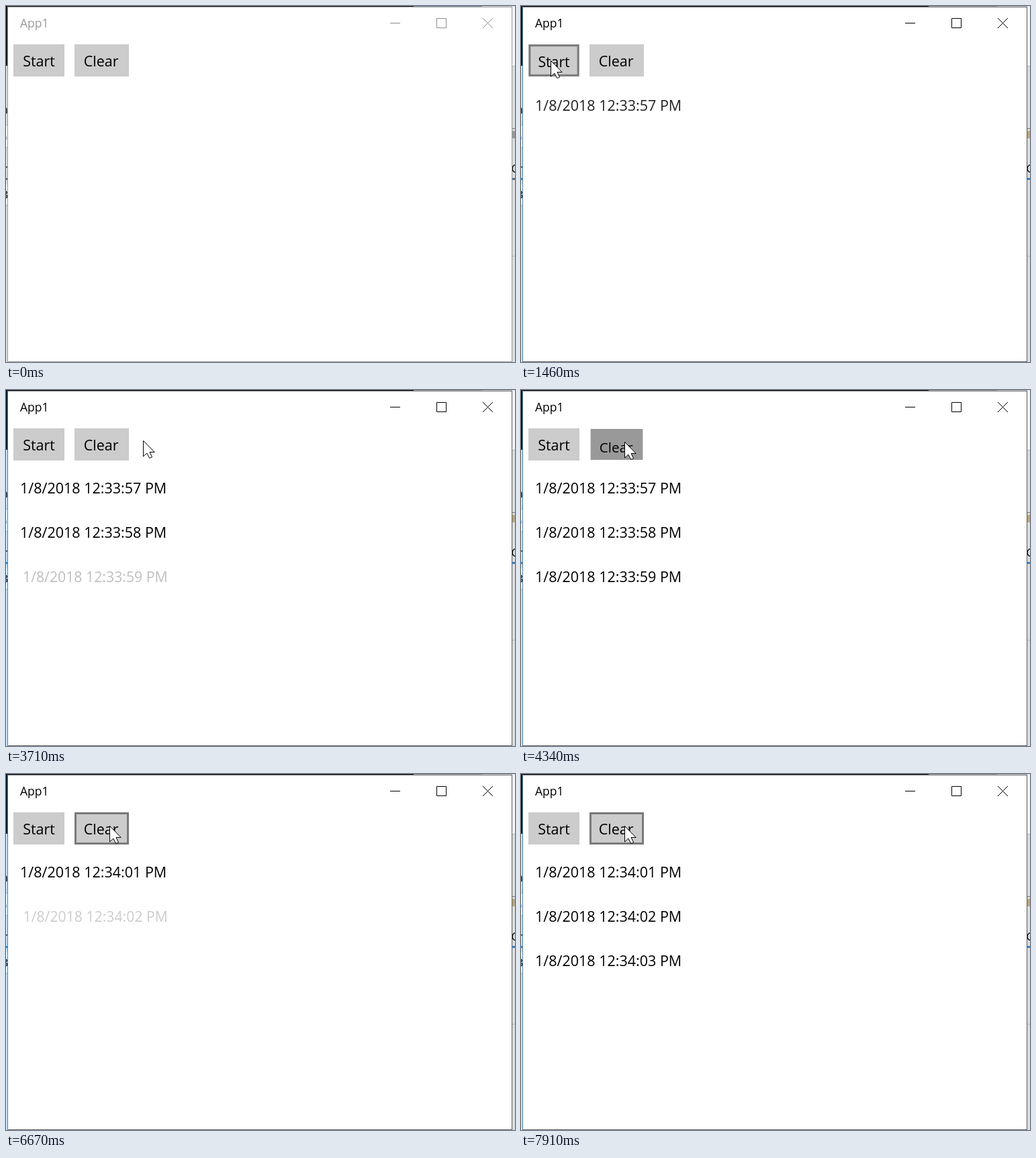
Recreate the animation shown at these times as an HTML page. Size 758x530 px, loop 8 s.

```html
<!DOCTYPE html>
<html lang="en">
<head>
<meta charset="utf-8">
<title>App1</title>
<style>
  html, body { margin: 0; width: 100%; height: 100%; overflow: hidden; background: #fff; }
  svg { display: block; font: 21.5px "Open Sans", "Noto Sans", sans-serif; }
  .icons { fill: none; stroke: #000; }
  .edge { fill: #5c5c5c; }
  .accent, .side { fill: #2a86d0; }
  .thumb { fill: #bba67c; }
  .sky { fill: #b4b8bb; }
  .idle .icons { stroke: #8c8c8c; }
  .idle .title { fill: #999; }
  .idle .edge, .idle .side { fill: #989898; }
  .idle .accent { fill: #50708f; }
  .idle .thumb { fill: #999; }
  .idle .sky { fill: #7896a5; }
</style>
</head>
<body>
<svg id="stage" width="758" height="530">
  <!-- desktop visible around the window -->
  <rect width="758" height="530" fill="#dcdcdc"/>
  <rect width="607" height="1" fill="#141414"/>
  <rect class="sky" x="607" width="102" height="1"/>
  <rect width="2" height="89" fill="#141414"/>
  <path d="M754 1h4v88h-4z" fill="#f4f4f4"/>
  <path d="M0 178h2v32H0zM0 265h2v31H0z" fill="#fafafa"/>
  <path d="M0 177.500h2M0 210.500h2M0 296.500h2M754 89.500h4M754 372.500h4" stroke="#b8b8b8"/>
  <path d="M754 182.500h4" stroke="#777"/>
  <rect class="thumb" x="754" y="186" width="4" height="11"/>
  <path class="accent" d="M0 256h2v3H0zM754 256h4v3h-4z"/>
  <g font-size="16">
    <text x="-7" y="160">n</text>
    <text x="-8" y="201" class="accent">o</text>
    <text x="-4" y="248">r</text>
    <text x="-6" y="287">3</text>
    <text x="752.500" y="248">C</text>
  </g>

  <!-- window -->
  <rect class="edge" x="2" y="1" width="752" height="529"/>
  <rect class="side" x="2" y="1" width="1" height="529"/>
  <rect x="3" y="2" width="750" height="527" fill="#fff"/>
  <text class="title" x="21" y="32" font-size="17.500">App1</text>
  <path class="icons" d="M572 25.500h15M641.500 18.500h14v14h-14zM710 18l15 15M725 18l-15 15"/>
  <g id="buttons"></g>
  <g id="items"></g>
  <path id="cursor" fill="#fff" stroke="#000" d="M.5 .5V24L5.800 19l4 7.500 3.800-1.700L10 17.500h7.200z"/>
</svg>
<script>
const LOOP = 8000, CLEARED = 4490;
const byId = id => document.getElementById(id);

function add(parent, tag, attrs, text = '') {
  const node = document.createElementNS('http://www.w3.org/2000/svg', tag);
  set(node, attrs);
  node.textContent = text;
  return parent.appendChild(node);
}
function set(node, attrs) {
  for (const key in attrs) node.setAttribute(key, attrs[key]);
}

// Progress 0..1 in n held steps; the first shows at start, the last at end.
function stepped(t, start, end, n) {
  if (t < start) return 0;
  if (t >= end) return 1;
  return (Math.floor((t - start) / (end - start) * (n - 1)) + 1) / n;
}

// start, end, steps, from, to, easing power
const moves = [
  [140, 690, 8, [598, 536], [44, 81], 1.6],
  [1620, 2090, 7, [44, 81], [317, 98], 1.6],
  [3560, 3710, 3, [317, 98], [204, 75], 1],
  [3785, 3940, 3, [204, 75], [154, 77], 1.6],
];

const buttons = [
  { label: 'Start', x: 11, width: 76, textX: 25.2, down: [990, 990, 1], release: 1240, up: [1310, 1530, 4] },
  { label: 'Clear', x: 102, width: 81, textX: 115.8, down: [4250, 4340, 2], release: CLEARED, up: [4650, 4870, 4] },
];
for (const b of buttons) {
  b.group = add(byId('buttons'), 'g', {});
  b.face = add(b.group, 'rect', { x: b.x, y: 57, width: b.width, height: 48 });
  b.border = add(b.group, 'rect', {
    x: b.x + 1.5, y: 58.5, width: b.width - 3, height: 45,
    fill: 'none', stroke: '#7a7a7a', 'stroke-width': 3,
  });
  b.text = add(b.group, 'text', { x: b.textX, y: 90 }, b.label);
}

// clock, row, start, end, steps, time of removal, entrance style
const items = [
  ['33:57', 0, 1240, 1530, 5, CLEARED, 'slide'],
  ['33:58', 1, 2710, 2950, 4, CLEARED, 'grow'],
  ['33:59', 2, 3710, 3945, 4, CLEARED, 'grow'],
  ['34:01', 0, 5190, 5190, 1, LOOP, 'grow'],
  ['34:02', 1, 6670, 6980, 5, LOOP, 'grow'],
  ['34:03', 2, 7680, 7910, 4, LOOP, 'grow'],
].map(([clock, row, start, end, steps, gone, style]) => ({
  start, end, steps, gone, style,
  y: 146 + row * 66,
  node: add(byId('items'), 'text', { x: 21, y: 154 + row * 66 }, `1/8/2018 12:${clock} PM`),
}));

const scaleAbout = (x, y, s) => `translate(${x} ${y}) scale(${s}) translate(${-x} ${-y})`;

function cursorAt(t) {
  const [start, end, n, from, to, power] = moves.findLast(m => t >= m[0]) || moves[0];
  const eased = 1 - (1 - stepped(t, start, end, n)) ** power;
  return from.map((v, i) => v + (to[i] - v) * eased);
}

function drawButton(b, t, [cx, cy]) {
  const tilt = stepped(t, ...b.down) - stepped(t, ...b.up);
  const pressed = t >= b.down[0] && t < b.release;
  const hover = cx >= b.x && cx < b.x + b.width && cy >= 57 && cy < 105;
  set(b.group, { transform: scaleAbout(b.x + b.width / 2, 81, 1 - 0.04 * tilt) });
  set(b.face, { fill: pressed ? '#999' : '#ccc' });
  set(b.border, { visibility: hover && !pressed ? 'visible' : 'hidden' });
  set(b.text, { y: 90 + 3 * tilt });
}

function drawItem(item, t) {
  const p = t < item.gone ? stepped(t, item.start, item.end, item.steps) : 0;
  const slide = item.style === 'slide';
  set(item.node, {
    opacity: slide && p ? Math.min(1, p + 0.07) : p,
    transform: slide
      ? `translate(0 ${40 * (1 - p) ** 1.9})`
      : scaleAbout(378, item.y, 1 - 0.02 * (1 - p) ** 2),
  });
}

function draw(now) {
  const t = now % LOOP;
  const cursor = cursorAt(t);
  byId('stage').classList.toggle('idle', t < 990);
  buttons.forEach(b => drawButton(b, t, cursor));
  items.forEach(item => drawItem(item, t));
  set(byId('cursor'), { transform: `translate(${cursor})` });
  requestAnimationFrame(draw);
}
draw(0);
</script>
</body>
</html>
```
